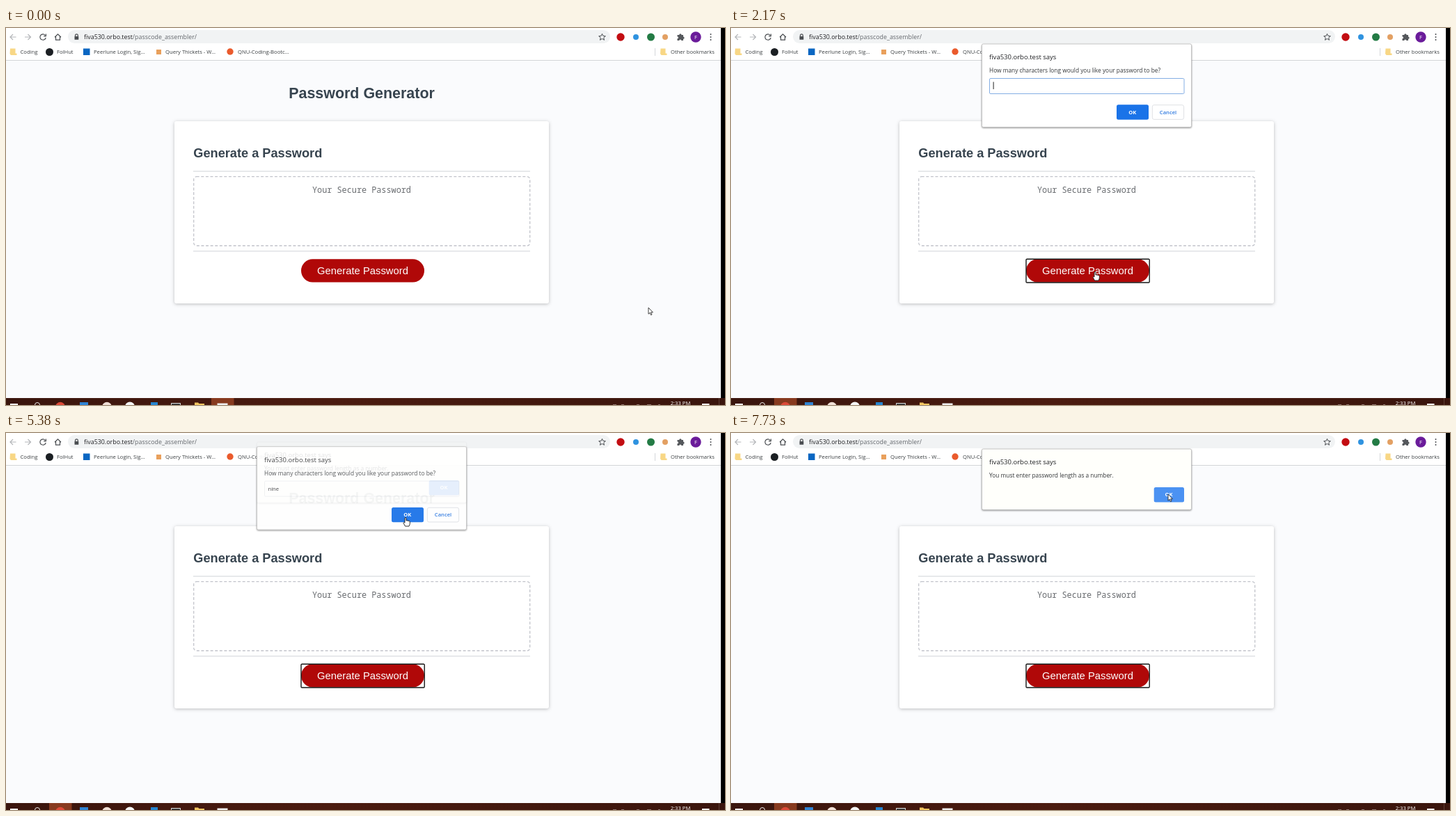
These frames come from a looping animation (1033x542 px, 8 s). An HTML page:

```html
<!DOCTYPE html>
<html lang="en">
<head>
<meta charset="utf-8">
<title>Password Generator</title>
<style>
html, body { margin: 0; width: 100%; height: 100%; overflow: hidden; background: #fafbfd; }
svg { display: block; width: 100%; height: 100%; }
.ui { font: 7.65px "Open Sans", sans-serif; fill: #3c4043; }
.page { font-family: "Liberation Sans", Arial, sans-serif; fill: #37444f; }
.bold { font-weight: bold; }
.mid { text-anchor: middle; }
.line { fill: none; stroke: #4a4d51; stroke-width: 1.2; }
.pale { stroke: #b4b6b9; }
.card { fill: #fff; filter: drop-shadow(0 1px 2.5px rgba(0,0,0,.25)); }
.box { stroke: #bdbdbd; stroke-width: .8; filter: drop-shadow(0 1px 1.2px rgba(0,0,0,.42)); }
.head { font-size: 9.5px; fill: #202124; }
.msg { font-size: 8.33px; fill: #333639; }
.ok { font-size: 7.6px; font-weight: bold; fill: #fff; }
.cancel { font-size: 7.6px; font-weight: 600; fill: #2f7ae0; }
</style>
</head>
<body>
<svg viewBox="0 0 1033 542" preserveAspectRatio="none">
  <defs>
    <linearGradient id="wood">
      <stop offset="0" stop-color="#3a150d"/>
      <stop offset=".45" stop-color="#4b1b10"/>
      <stop offset="1" stop-color="#3a150d"/>
    </linearGradient>
  </defs>
  <rect width="1033" height="542" fill="#fafbfd"/>

  <!-- browser bars -->
  <rect width="1027" height="46" fill="#fff"/>
  <rect y="46" width="1027" height="1" fill="#d3d5d8"/>
  <rect x="89" y="3" width="779" height="19" rx="9.5" fill="#f1f3f4"/>
  <g class="line">
    <path class="pale" d="M14.5 13H6M10 9L6 13l4 4M27 13h8.500M31.500 9l4 4-4 4"/>
    <path d="M56.300 10.300A4.200 4.200 0 1 0 57.200 14M57.400 8.500v3.200h-3.200"/>
    <path d="M70 13.200l4.500-4.400 4.500 4.400M71.500 12v5.200h6V12"/>
    <path d="M99.500 12.500v-1.700a1.900 1.900 0 0 1 3.800 0v1.700"/>
    <path d="M856.500 8.300l1.400 3.100 3.400.3-2.600 2.300.8 3.300-3-1.800-3 1.800.8-3.300-2.600-2.300 3.400-.3z" stroke-width="1"/>
  </g>
  <rect x="98.500" y="12" width="5.800" height="4.800" rx=".6" fill="#4a4d51"/>
  <text class="ui" x="112" y="16.200" style="font-size:8.9px;fill:#202124">fiva530.orbo.test<tspan fill="#63676c">/passcode_assembler/</tspan></text>

  <circle cx="883" cy="13" r="5.700" fill="#c30d12"/>
  <circle cx="905" cy="13" r="4" fill="#2f93e0"/>
  <circle cx="926.500" cy="13" r="5.500" fill="#237b45"/>
  <circle cx="947" cy="13" r="4" fill="#e3a063"/>
  <path d="M964.500 10h2.700a1.700 1.700 0 0 1 3.400 0h2.400v2.600a1.600 1.600 0 0 1 0 3.200v2.200h-2.700a1.500 1.500 0 0 0-3 0h-2.800v-2.700a1.500 1.500 0 0 0 0-3z" fill="#55585c"/>
  <circle cx="991" cy="13" r="7.700" fill="#6a1b9a"/>
  <text class="ui mid" x="991" y="15.800" style="fill:#fff">F</text>
  <path d="M1012.500 9v.01M1012.500 13v.01M1012.500 17v.01" stroke="#4a4d51" stroke-width="2" stroke-linecap="round"/>

  <g fill="#f8d785">
    <path d="M6 29.500h7.500v7h2v2.500h-8.500l-1.500-2z"/>
    <path d="M940.500 29.500h7v7h2v2.500h-8l-1.500-2z"/>
  </g>
  <circle cx="62.500" cy="34.500" r="5.500" fill="#1b1f23"/>
  <rect x="111" y="29.500" width="9.500" height="9.500" fill="#0a66c2"/>
  <rect x="216" y="31" width="7" height="7" fill="#e9a05c"/>
  <circle cx="322" cy="34" r="4.700" fill="#ea5a2c"/>
  <path d="M932.500 29v11" stroke="#d5d7da"/>
  <g class="ui">
    <text x="20.500" y="37">Coding</text>
    <text x="73" y="37">FolHut</text>
    <text x="126" y="37">Peerlune Login, Sig...</text>
    <text x="229" y="37">Query Thickets - W...</text>
    <text x="333" y="37">QNU-Coding-Bootc...</text>
    <text x="955" y="37">Other bookmarks</text>
  </g>

  <!-- page -->
  <g class="page">
    <text class="bold mid" x="511" y="101" font-size="21.45">Password Generator</text>
    <rect class="card" x="242" y="134" width="538" height="262" rx="3"/>
    <text class="bold" x="269.300" y="186" font-size="18.2">Generate a Password</text>
    <path d="M269 206h484M269 320.700h484" stroke="#e0e2e5" stroke-width="1.600"/>
    <rect x="269.700" y="213.700" width="483" height="99.300" rx="4" fill="#fff" stroke="#c2c4cb" stroke-width="1.300" stroke-dasharray="4 2.600"/>
    <text class="mid" x="511" y="236.500" style="font:11.83px 'Noto Sans Mono',monospace;fill:#696c70">Your Secure Password</text>
    <rect x="424" y="332.300" width="177" height="33.300" rx="16.650" fill="#b00808"/>
    <rect id="ring" x="424" y="332.200" width="177.200" height="33.800" rx="1.200" fill="none" stroke="#151515" stroke-width="1.400"/>
    <text class="mid" x="512.500" y="353.700" font-size="14.8" style="fill:#fff">Generate Password</text>
  </g>

  <!-- taskbar -->
  <rect x="1027" width="6" height="533" fill="#000"/>
  <rect y="532" width="1033" height="10" fill="url(#wood)"/>
  <rect id="task" y="532" width="32.500" height="10" fill="#873a1f"/>
  <rect x="6" y="540" width="11" height="2" fill="#fff"/>
  <path d="M41.500 542a3.500 3.500 0 0 1 7 0" fill="none" stroke="#eee"/>
  <circle cx="78" cy="544.500" r="6.800" fill="#dc4a38"/>
  <rect x="106" y="538" width="12" height="4" fill="#2f83d3"/>
  <circle cx="145" cy="544.500" r="6.800" fill="#f0dfd6"/>
  <circle cx="178" cy="544.500" r="7" fill="#f4f4f4"/>
  <rect x="208" y="538" width="10" height="4" fill="#2584cf"/>
  <rect x="237" y="539" width="14" height="3" fill="#d0d0d0"/>
  <rect x="238" y="540.300" width="12" height="2" fill="#222"/>
  <path d="M271 542v-3.500h5l1.500 1.500h7.500v2z" fill="#f3c560"/>
  <rect x="303.500" y="539.500" width="15" height="3" fill="#eee"/>
  <path d="M872 541.500h5M884 541.500h4M906 541.500h4M921 541.500h6M937 541.500h3" stroke="#8d726c"/>
  <text class="ui mid" x="969" y="541.700" style="fill:#fff">2:33 PM</text>
  <rect x="1000" y="540" width="10.500" height="2" fill="#fff"/>
  <path d="M1024.500 532v10" stroke="#6d5148" stroke-width=".7"/>

  <!-- dialogs -->
  <g id="ask" class="ui">
    <rect class="box" x="360.500" y="23" width="301" height="119.500" rx="2" fill="#fff"/>
    <text class="head" x="371" y="45">fiva530.orbo.test says</text>
    <text class="msg" x="371" y="64">How many characters long would you like your password to be?</text>
    <rect id="field" x="371.500" y="72.500" width="279.500" height="22" rx="1.500" fill="#fff"/>
    <text id="typed" x="376.500" y="86" style="fill:#202124"></text>
    <rect id="caret" y="77.500" width="1" height="10.500" fill="#222"/>
    <rect id="ok" x="554" y="110.300" width="46" height="21.400" rx="2.500"/>
    <text class="ok mid" x="576.700" y="123.600">OK</text>
    <rect x="605.300" y="110.700" width="45.300" height="20.700" rx="2.500" fill="#fff" stroke="#dcdee2" stroke-width=".9"/>
    <text class="cancel mid" x="628" y="123.600">Cancel</text>
  </g>
  <g id="warn" class="ui">
    <rect class="box" x="360.500" y="23" width="301" height="87.300" rx="2" fill="#fffffb"/>
    <text class="head" x="371" y="45">fiva530.orbo.test says</text>
    <text class="msg" x="371" y="64">You must enter password length as a number.</text>
    <rect id="close" x="607.700" y="78" width="43.300" height="21.600" rx="2.500"/>
    <text class="ok mid" x="629" y="91.400">OK</text>
  </g>

  <g id="cursor" fill="#fff" stroke="#222" stroke-linejoin="round">
    <path id="arrow" stroke-width=".85" d="M0 0V9.200L2.100 7.300 3.500 10.600 5 10 3.600 6.800H6.400Z"/>
    <path id="hand" stroke-width=".95" d="M-1 7.500V1.200Q0-.4 1 1.200V5Q2 4.200 3 5.200 4 4.500 4.800 5.700 6 5.200 6.300 6.600V9.500Q6 11 5 13H-.5Q-1.500 11-3 8.500-2.600 6.600-1 8Z"/>
  </g>
</svg>
<script>
const LOOP = 8000, STEP = 80;
const $ = id => document.getElementById(id);
const set = (id, key, value) => $(id).setAttribute(key, value);
const show = (id, on) => set(id, 'visibility', on ? 'visible' : 'hidden');

// Pointer moves: start, end, way points
const moves = [
  [290, 850, [[923, 402], [524, 353]]],
  [1080, 1320, [[524, 353], [523, 350]]],
  [2560, 2560, [[523, 349]]],
  [4260, 5060, [[601, 156], [700, 82], [724, 62], [668, 84], [596, 112], [574, 121]]],
  [7090, 7730, [[574, 121], [628, 88]]]
];

// Held values: time, value
const asked = [[0, [0, 0]], [1940, [.15, -5]], [2020, [.55, -4]], [2090, [.9, -2]], [2170, [1, 0]],
  [5300, [.98, -1]], [5380, [.94, -3.4]], [5460, [.3, -5]], [5540, [0, 0]]];
const warned = [[0, [0, 0]], [5380, [.12, -10]], [5460, [.75, -3]], [5540, [1, 0]]];
const typing = [[0, ''], [3410, 'n'], [3490, 'ni'], [3640, 'nin'], [3720, 'nine']];
const blink = [[0, true], [2560, false], [3020, true], [4260, false]];
const okFill = [[0, '#1a73e8'], [5060, '#2b7de9'], [5140, '#4a8fee'], [5220, '#3a86ec'], [5300, '#1a73e8']];

const held = (list, t) => list.filter(k => k[0] <= t).pop()[1];

function pointer(t) {
  const [start, end, pts] = moves.filter(m => m[0] <= t).pop() || moves[0];
  if (pts.length < 2) return pts[0];
  const ticks = Math.max(0, Math.floor((t - start) / STEP + .01));
  let f = Math.min(1, ticks * STEP / (end - start));
  if (pts.length === 2) f = f * f * (3 - 2 * f);
  const pos = f * (pts.length - 1), i = Math.min(Math.floor(pos), pts.length - 2);
  return pts[i].map((v, k) => v + (pts[i + 1][k] - v) * (pos - i));
}

function pose(id, [opacity, dy]) {
  show(id, opacity > 0);
  set(id, 'opacity', opacity);
  set(id, 'transform', `translate(0 ${dy})`);
}

function draw(t) {
  const [x, y] = pointer(t);
  const isArrow = t < 1000 ? x > 601 : t > 7170 && y < 110;
  set('cursor', 'transform', `translate(${x} ${y})`);
  show('arrow', isArrow);
  show('hand', !isArrow);

  show('ring', t >= 1860);
  set('task', 'x', t < 1860 ? 295 : 62);
  pose('ask', held(asked, t));
  pose('warn', held(warned, t));

  $('typed').textContent = held(typing, t);
  set('caret', 'x', 376.6 + $('typed').getComputedTextLength());
  set('caret', 'opacity', held(blink, t) ? 1 : 0);
  set('field', 'stroke', t < 5300 ? '#84aee4' : '#eeeff1');
  set('ok', 'fill', held(okFill, t));
  set('close', 'fill', t > 7170 && y < 100 ? '#4b92f2' : '#3f87ee');
}

function frame(now) {
  draw(now % LOOP);
  requestAnimationFrame(frame);
}
draw(0);
requestAnimationFrame(frame);
</script>
</body>
</html>
```
